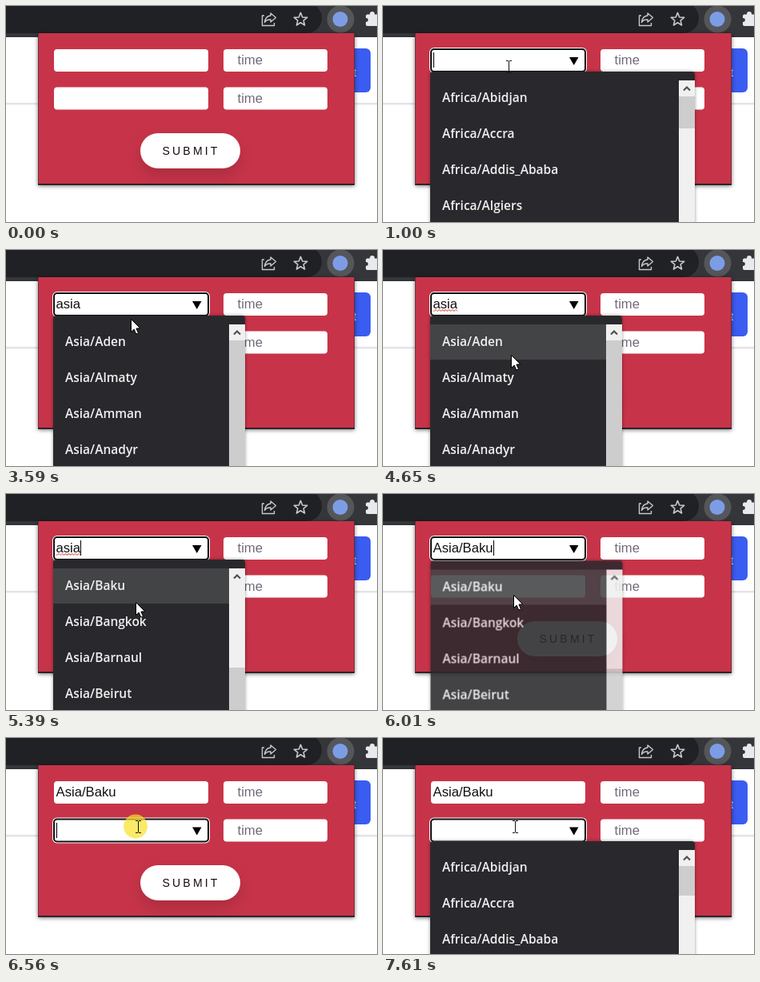
Animation of 464 by 270 pixels, one loop 8 s. Source, as an HTML page with a canvas:

```html
<!DOCTYPE html>
<html lang="en">
<head>
<meta charset="utf-8">
<title>Time zone form</title>
<style>
html, body { margin: 0; width: 100%; height: 100%; overflow: hidden; background: #fff; }
canvas { display: block; }
</style>
</head>
<body>
<canvas id="stage" width="464" height="270"></canvas>
<script>
const ctx = document.getElementById('stage').getContext('2d');
const LOOP = 8000, ROW = 45;
const UI = '"Open Sans", "Noto Sans", sans-serif';
const ARIAL = '"Liberation Sans", Arial, sans-serif';

const zones = (area, names) => names.split(' ').map(n => area + '/' + n);
const AFRICA = zones('Africa', 'Abidjan Accra Addis_Ababa Algiers');
const MATCH_AS = zones('Africa', 'Asmara Casablanca Kinshasa Lubumbashi');
const ASIA = zones('Asia', 'Aden Almaty Amman Anadyr Aqtau Aqtobe Ashgabat Atyrau ' +
  'Baghdad Bahrain Baku Bangkok Barnaul Beirut');

// start, end, steps, target x, target y
const MOVES = [
  [260, 670, 7, 157, 76],
  [3590, 3660, 2, 155, 95],
  [4060, 4190, 3, 155, 105],
  [4400, 4650, 5, 160, 131],
  [5340, 5460, 3, 165, 143],
  [5540, 5610, 2, 163, 126],
  [6080, 6290, 4, 165, 111]
];

// value of the last [time, value] pair already reached
const at = (t, pairs) => pairs.reduce((v, p) => t >= p[0] ? p[1] : v, pairs[0][1]);

function pointer(t) {
  let x = 230, y = 258;
  for (const [t0, t1, n, tx, ty] of MOVES) {
    if (t < t0) break;
    const k = Math.min(n, Math.floor((t - t0) / (t1 - t0) * (n - 1) + 1.02)) / n;
    x += (tx - x) * k;
    y += (ty - y) * k;
  }
  return { x: Math.round(x), y: Math.round(y) };
}

function rect(x, y, w, h, color) {
  ctx.fillStyle = color;
  ctx.fillRect(x, y, w, h);
}

function round(x, y, w, h, r, color) {
  ctx.fillStyle = color;
  ctx.beginPath();
  ctx.roundRect(x, y, w, h, r);
  ctx.fill();
}

function disc(x, y, r, color) {
  ctx.fillStyle = color;
  ctx.beginPath();
  ctx.arc(x, y, r, 0, 7);
  ctx.fill();
}

function poly(points, closed = true) {
  ctx.beginPath();
  points.forEach(([x, y]) => ctx.lineTo(x, y));
  if (closed) ctx.closePath();
}

function text(str, x, y, font, color, spacing = 0) {
  ctx.font = font;
  ctx.letterSpacing = spacing + 'px';
  ctx.fillStyle = color;
  ctx.fillText(str, x, y);
}

function shadow(color, blur, dy, draw) {
  ctx.save();
  ctx.shadowColor = color;
  ctx.shadowBlur = blur;
  ctx.shadowOffsetY = dy;
  draw();
  ctx.restore();
}

function toolbar() {
  rect(0, 0, 464, 39, '#35363a');
  round(-30, -4, 425, 38, 19, '#202124');
  ctx.strokeStyle = '#c6c8cb';
  ctx.lineWidth = 1.4;
  ctx.lineJoin = 'round';

  // share
  poly([[323, 12], [320.5, 12], [320.5, 24.5], [335.5, 24.5], [335.5, 21]], false);
  ctx.stroke();
  ctx.beginPath();
  ctx.moveTo(331, 9);
  ctx.lineTo(337.5, 14.5);
  ctx.lineTo(331, 20);
  ctx.lineTo(331, 17);
  ctx.quadraticCurveTo(326, 16.5, 323.5, 20.5);
  ctx.quadraticCurveTo(324.5, 12.5, 331, 12);
  ctx.closePath();
  ctx.stroke();

  // star
  poly(Array.from({ length: 10 }, (_, i) => {
    const a = i * Math.PI / 5 - Math.PI / 2, r = i % 2 ? 3.8 : 8.6;
    return [368.5 + r * Math.cos(a), 17 + r * Math.sin(a)];
  }));
  ctx.lineWidth = 1.6;
  ctx.stroke();

  disc(418.5, 16.5, 17, '#55565a');
  disc(418, 16.5, 9.5, '#7c9de6');

  // extensions
  round(450, 10.5, 16, 14.5, 2, '#e8eaed');
  disc(458, 10, 3, '#e8eaed');
  disc(450.5, 17.5, 2.4, '#35363a');
}

function page() {
  rect(0, 39, 464, 231, '#fff');
  rect(0, 121, 464, 2, '#e4e4e6');
  rect(0, 123, 464, 1, '#f4f4f5');
  round(380, 53, 76, 55, 6, '#3a5cf0');
  text('t', 434, 88, '15px ' + ARIAL, '#dfe5ff');
}

function field(x, y, w, value, hint) {
  round(x, y, w, 28, 4, '#fff');
  if (hint) text(hint, x + 17.5, y + 19, '16.7px ' + ARIAL, '#74697a');
  else if (value) text(value, x + 2.5, y + 19, '16.7px ' + ARIAL, '#111');
}

function focusRing(y) {
  round(58, y - 2, 197, 32, 6, '#fff');
  round(59, y - 1, 195, 30, 5, '#101014');
  round(61, y + 1, 191, 26, 3, '#fff');
}

function dropArrow(y) {
  ctx.fillStyle = '#000';
  poly([[233, y + 10], [244.5, y + 10], [238.75, y + 20]]);
  ctx.fill();
}

function squiggle(x0, x1, y) {
  ctx.strokeStyle = '#e0392f';
  ctx.lineWidth = 1;
  ctx.beginPath();
  for (let x = x0; x <= x1; x++) ctx.lineTo(x, y + Math.sin(x * 1.5));
  ctx.stroke();
}

function caret(value, y) {
  ctx.font = '16.7px ' + ARIAL;
  ctx.letterSpacing = '0px';
  rect(Math.round(62.5 + ctx.measureText(value).width), y + 4, 1, 19, '#000');
}

function panel(lift) {
  shadow('rgba(0,0,0,.55)', 5, 1, () => rect(40, 34, 396, 190, '#2c2328'));
  rect(40.5, 34, 395, 188, '#c73449');
  const s = lift / 7;
  shadow(`rgba(0,0,0,${0.14 + 0.1 * s})`, 18 + 6 * s, 9 + 8 * s,
    () => round(168, 159 - lift, 125, 44, 22, '#fff'));
  text('SUBMIT', 195.5, 185.5 - lift, '14px ' + ARIAL, '#16090d', 3.2);
}

function list({ items, top, w, thumb, thumbY = 0, scroll = 0, hover = -1, alpha = 1 }) {
  const layer = new OffscreenCanvas(464, 270);
  const main = ctx.canvas.getContext('2d');
  const g = layer.getContext('2d');
  const fill = (x, y, fw, fh, color) => { g.fillStyle = color; g.fillRect(x, y, fw, fh); };
  const x = 59, bar = x + w - 20, head = top + 11;

  g.shadowColor = 'rgba(0,0,0,.4)';
  g.shadowBlur = 4;
  g.fillStyle = '#29292d';
  g.beginPath();
  g.roundRect(x, top, w, 300, 4);
  g.fill();
  g.shadowColor = 'transparent';

  if (hover >= 0) fill(x, head + hover * ROW, w - 20, ROW - 1, '#434446');
  g.font = '600 15.5px ' + UI;
  g.fillStyle = '#f0f0f1';
  items.slice(scroll, scroll + 4).forEach((name, i) => g.fillText(name, 74, top + 38 + i * ROW));

  fill(bar, head, 20, 270, '#f0f0f0');
  fill(bar, head + 20 + thumbY, 20, thumb, '#cdcdcd');
  g.strokeStyle = '#505054';
  g.lineWidth = 2.2;
  g.beginPath();
  g.moveTo(bar + 6, head + 12.5);
  g.lineTo(bar + 10, head + 8.5);
  g.lineTo(bar + 14, head + 12.5);
  g.stroke();

  main.globalAlpha = alpha;
  main.drawImage(layer, alpha < 1 ? 0.5 : 0, alpha < 1 ? 1.5 : 0);
  main.globalAlpha = 1;
}

function openList(t, p) {
  if (t >= 6620) return list({ items: AFRICA, top: 129, w: 331, thumb: 37 });
  if (t < 880 || t >= 6150) return;
  if (t < 2590) return list({ items: AFRICA, top: 82, w: 331, thumb: 40, alpha: t < 1000 ? 0.9 : 1 });
  if (t < 2660) return list({ items: MATCH_AS, top: 82, w: 255, thumb: 300 });
  const scroll = at(t, [[0, 0], [4800, 3], [4870, 7], [4940, 10]]);
  list({
    items: ASIA, top: 82, w: 240, thumb: 210, scroll, thumbY: scroll * 10.4,
    hover: t < 3590 ? -1 : Math.floor((p.y - 93) / ROW),
    alpha: at(t, [[0, 1], [6010, 0.88], [6080, 0.4]])
  });
}

function arrowCursor(x, y) {
  poly([[0, 0], [0, 16], [3.7, 12.6], [6.2, 18.5], [9, 17.3], [6.4, 11.6], [11.3, 11.3]]
    .map(([dx, dy]) => [x + dx + 0.5, y + dy + 0.5]));
  ctx.fillStyle = '#fff';
  ctx.strokeStyle = '#000';
  ctx.lineWidth = 1;
  ctx.fill();
  ctx.stroke();
}

function beamCursor(x, y) {
  rect(x, y - 7, 1, 14, '#111');
  for (const end of [y - 8, y + 7]) {
    rect(x - 3, end, 3, 1, '#111');
    rect(x + 1, end, 3, 1, '#111');
  }
}

function draw(t) {
  const p = pointer(t);
  const value = at(t, [[0, ''], [2460, 'a'], [2525, 'as'], [2660, 'asi'], [2790, 'asia'], [6010, 'Asia/Baku']]);
  const focus = at(t, [[0, 0], [810, 1], [6560, 2]]);
  const typedAt = at(t, [[0, 0], [810, 940], [2460, 2460], [2525, 2525], [2660, 2660],
    [2790, 2790], [6010, 6010], [6560, 6550]]);
  const caretOn = t < typedAt || Math.floor((t - typedAt) / 531) % 2 === 0;
  const lift = 5 * Math.max(0, Math.min((t - 330) / 140, (670 - t) / 200, 1));
  const listOpen = t >= 880 && t < 6080 || t >= 6620;
  const inside = y => t >= 260 && p.x > 60 && p.x < 253 && p.y >= y && p.y <= y + 28;
  const over = inside(54) ? 1 : !listOpen && inside(101) ? 2 : t >= 6620 ? 2 : 0;

  page();
  toolbar();
  panel(lift);
  [54, 101.5].forEach((y, i) => {
    const n = i + 1, str = n === 1 ? value : '';
    field(60, y, 193, focus === n ? '' : str);
    field(272, y, 130, '', 'time');
    if (focus === n) {
      focusRing(y);
      text(str, 62.5, y + 19, '16.7px ' + ARIAL, '#111');
      if (str === 'asia' && t >= 3860) squiggle(63, 93, y + 21.5);
      if (caretOn) caret(str, Math.round(y + 0.1));
    }
    if (focus === n || over === n) dropArrow(y);
  });
  openList(t, p);

  if (t >= 810 && t < 880) disc(157, 76, 15, 'rgba(250,225,40,.7)');
  if (t >= 5940 && t < 6010) disc(162, 126, 15, 'rgba(250,225,40,.6)');
  if (t >= 6560 && t < 6620) disc(162, 110.5, 15, 'rgba(250,225,40,.7)');
  if (t >= 260) (over ? beamCursor : arrowCursor)(p.x, p.y);
}

function tick(now) {
  draw(now % LOOP);
  requestAnimationFrame(tick);
}
requestAnimationFrame(tick);
</script>
</body>
</html>
```
